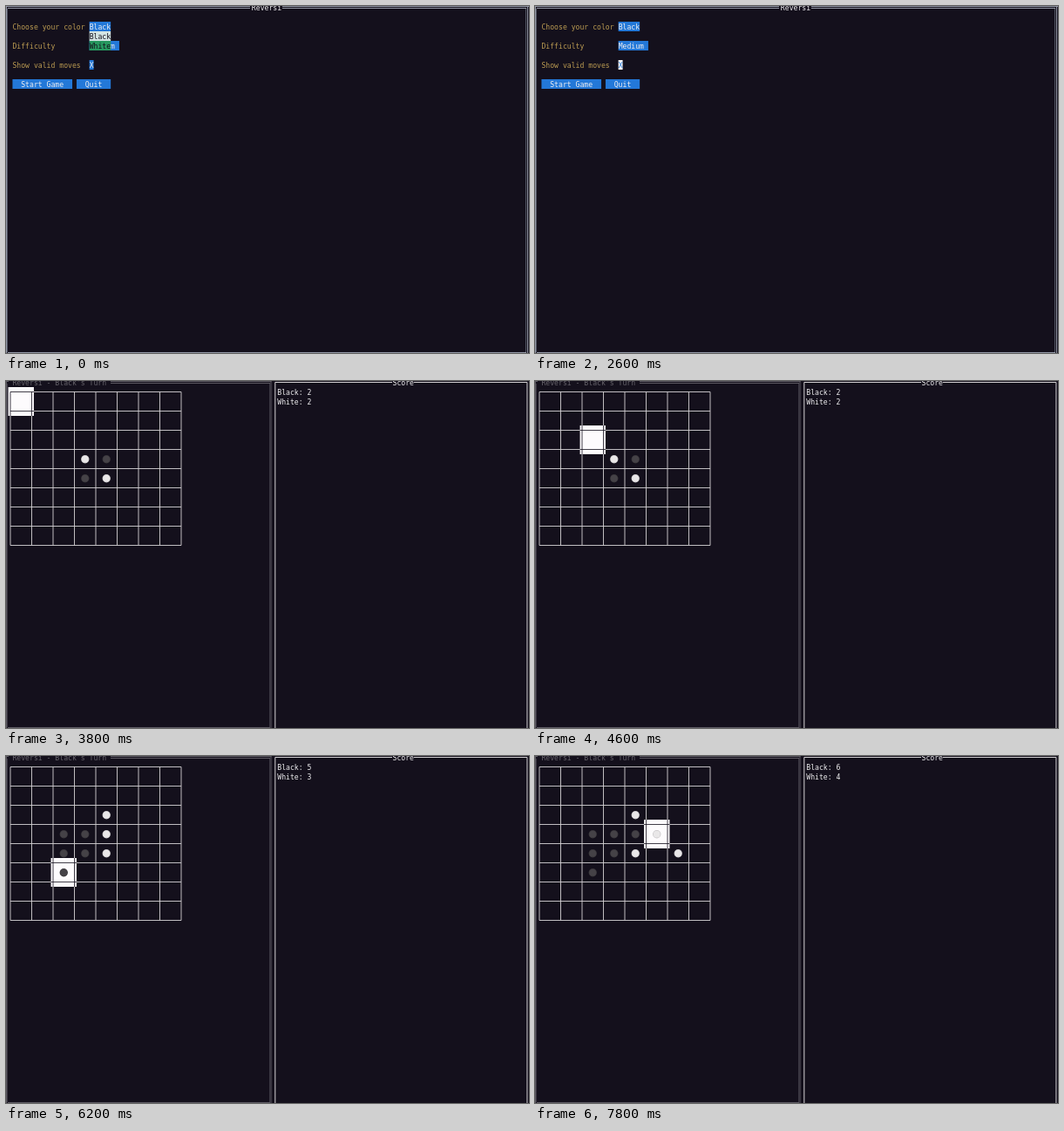
These frames come from a looping animation (600x398 px, 8 s). An HTML page:

```html
<!DOCTYPE html>
<html lang="en">
<head>
<meta charset="utf-8">
<title>Reversi</title>
<style>
  html, body { margin: 0; width: 100%; height: 100%; overflow: hidden; background: #14101c; }
  svg { display: block; }
  text { font: 8.14px "DejaVu Sans Mono", monospace; white-space: pre; }
</style>
</head>
<body>
<svg id="stage" width="600" height="398" viewBox="0 0 600 398"></svg>
<script>
const LOOP = 8000, STEP = 200, GAME_START = 3800;
const CW = 4.9, CH = 11, SIZE = 8;
const BG = '#14101c', BLUE = '#2378d8', GREEN = '#27985f', LABEL = '#bb9b52',
      TEXT = '#f0eff1', WHITE = '#fdfbfd', DIM = '#5c5962', FRAME = '#9297a5', GRID = '#d4d2d4';

// Terminal column and row to pixels
const colX = c => c * CW - 2.35;
const rowY = r => r * CH - 4;
const lineX = n => 5 + n * 24.5;
const lineY = n => 12.5 + n * 22;

const rect = (x, y, w, h, fill) => `<rect x="${x}" y="${y}" width="${w}" height="${h}" fill="${fill}"/>`;
const path = (d, stroke, width = 1) =>
  `<path d="${d}" fill="none" stroke="${stroke}" stroke-width="${width}"/>`;
const label = (col, row, str, fill = TEXT) =>
  `<text x="${colX(col)}" y="${rowY(row) + 8.6}" fill="${fill}">${str}</text>`;
const field = (col, row, str, bg = BLUE, fg = TEXT) =>
  rect(colX(col), rowY(row), str.length * CW, CH, bg) + label(col, row, str, fg);
const focusable = (col, row, str, focused) =>
  focused ? field(col, row, str, WHITE, BLUE) : field(col, row, str);

// Last entry of a time-ordered table that has begun
const at = (table, t) => table.filter(([start]) => start <= t).pop()[1];

const FOCUS = [[0, 'list'], [1800, 'color'], [2200, 'level'], [2400, 'check'], [3200, 'start']];

const CURSOR = [
  [3800, [0, 0]], [4000, [1, 0]], [4200, [2, 0]], [4400, [2, 1]], [4600, [2, 2]], [4800, [2, 3]],
  [5600, [2, 4]], [5800, [2, 5]],
  [6600, [3, 5]], [6800, [4, 5]], [7000, [5, 5]], [7200, [5, 4]], [7400, [5, 3]]
];

const MOVES = [
  [5000, 'B', 2, 3], [5200, 'W', 2, 4],
  [6000, 'B', 2, 5], [6200, 'W', 4, 2],
  [7600, 'B', 5, 3], [7800, 'W', 6, 4]
];

function place(board, player, x, y) {
  board[[x, y]] = player;
  for (const dx of [-1, 0, 1]) for (const dy of [-1, 0, 1]) {
    if (!dx && !dy) continue;
    const run = [];
    let cx = x + dx, cy = y + dy;
    while (board[[cx, cy]] && board[[cx, cy]] !== player) {
      run.push([cx, cy]);
      cx += dx;
      cy += dy;
    }
    if (board[[cx, cy]]) run.forEach(cell => board[cell] = player);
  }
}

function menu(t) {
  const focus = at(FOCUS, t);
  let out = path('M0 .5H280M317 .5H600M2 2.5H280M317 2.5H597', FRAME) +
    path('M.5 0V398M598.5 0V398M2 397.5H597', FRAME) +
    path('M1.5 3V397M596.5 3V397', '#555966') +
    label(58, 0, 'Reversi') +
    label(2, 2, 'Choose your color', LABEL) +
    label(2, 4, 'Difficulty', LABEL) +
    label(2, 6, 'Show valid moves', LABEL) +
    focusable(20, 2, 'Black', focus === 'color') +
    focusable(20, 4, 'Medium ', focus === 'level') +
    focusable(20, 6, t < 2800 ? 'X' : ' ', focus === 'check') +
    focusable(2, 8, '  Start Game  ', focus === 'start') +
    focusable(17, 8, '  Quit  ', false);
  if (focus === 'list') {
    out += field(20, 3, 'Black', t < STEP ? '#d3e4e3' : WHITE, BG) + field(20, 4, 'White', GREEN, BG);
  }
  return out;
}

function gridPath() {
  let d = '';
  for (let n = 0; n <= SIZE; n++) {
    d += `M${lineX(n)} ${lineY(0)}V${lineY(SIZE)}M${lineX(0)} ${lineY(n)}H${lineX(SIZE)}`;
  }
  return d;
}

function cursorBox([x, y]) {
  const left = lineX(x) - CW / 2, top = lineY(y) - CH / 2, w = 6 * CW, h = 3 * CH;
  return rect(left, top, w, h, WHITE) +
    `<svg x="${left}" y="${top}" width="${w}" height="${h}" viewBox="${left} ${top} ${w} ${h}">` +
    path(gridPath(), BG, 0.8) + '</svg>';
}

function disc(key, player) {
  const [x, y] = key.split(',').map(Number);
  const cx = lineX(x) + 12.25, cy = lineY(y) + 11.2;
  const [edge, face] = player === 'B' ? ['#39363b', '#454247'] : ['#c9c7ca', '#e9e7e8'];
  return `<circle cx="${cx}" cy="${cy}" r="4.7" fill="${edge}"/>` +
    `<circle cx="${cx}" cy="${cy}" r="3.9" fill="${face}"/>`;
}

function game(t) {
  const board = { '3,3': 'W', '4,3': 'B', '3,4': 'B', '4,4': 'W' };
  const played = MOVES.filter(([start]) => start <= t);
  played.forEach(([, ...move]) => place(board, ...move));
  const score = player => Object.values(board).filter(p => p === player).length;
  const turn = played.length % 2 ? 'White' : 'Black';

  return path('M0 .5H3M120 .5H304.5M120 2.5H303M.5 0V398M304 0V398M2 397.5H303', DIM) +
    path('M1.5 3V397M302.5 3V397', '#3b3842') +
    label(2, 0, `Reversi - ${turn}'s Turn`, '#66636b') +
    path('M308.8 398V1.5H443M468 1.5H597.9V398', GRID) +
    label(91, 0, 'Score') +
    label(64, 1, `Black: ${score('B')}`) +
    label(64, 2, `White: ${score('W')}`) +
    path(gridPath(), GRID, 0.9) +
    cursorBox(at(CURSOR, t)) +
    Object.entries(board).map(([key, player]) => disc(key, player)).join('');
}

const stage = document.getElementById('stage');
let shown = -1;

function draw() {
  const t = Math.floor(performance.now() % LOOP / STEP) * STEP;
  if (t !== shown) {
    stage.innerHTML = rect(0, 0, 600, 398, BG) + (t < GAME_START ? menu(t) : game(t));
    shown = t;
  }
  requestAnimationFrame(draw);
}
draw();
</script>
</body>
</html>
```
